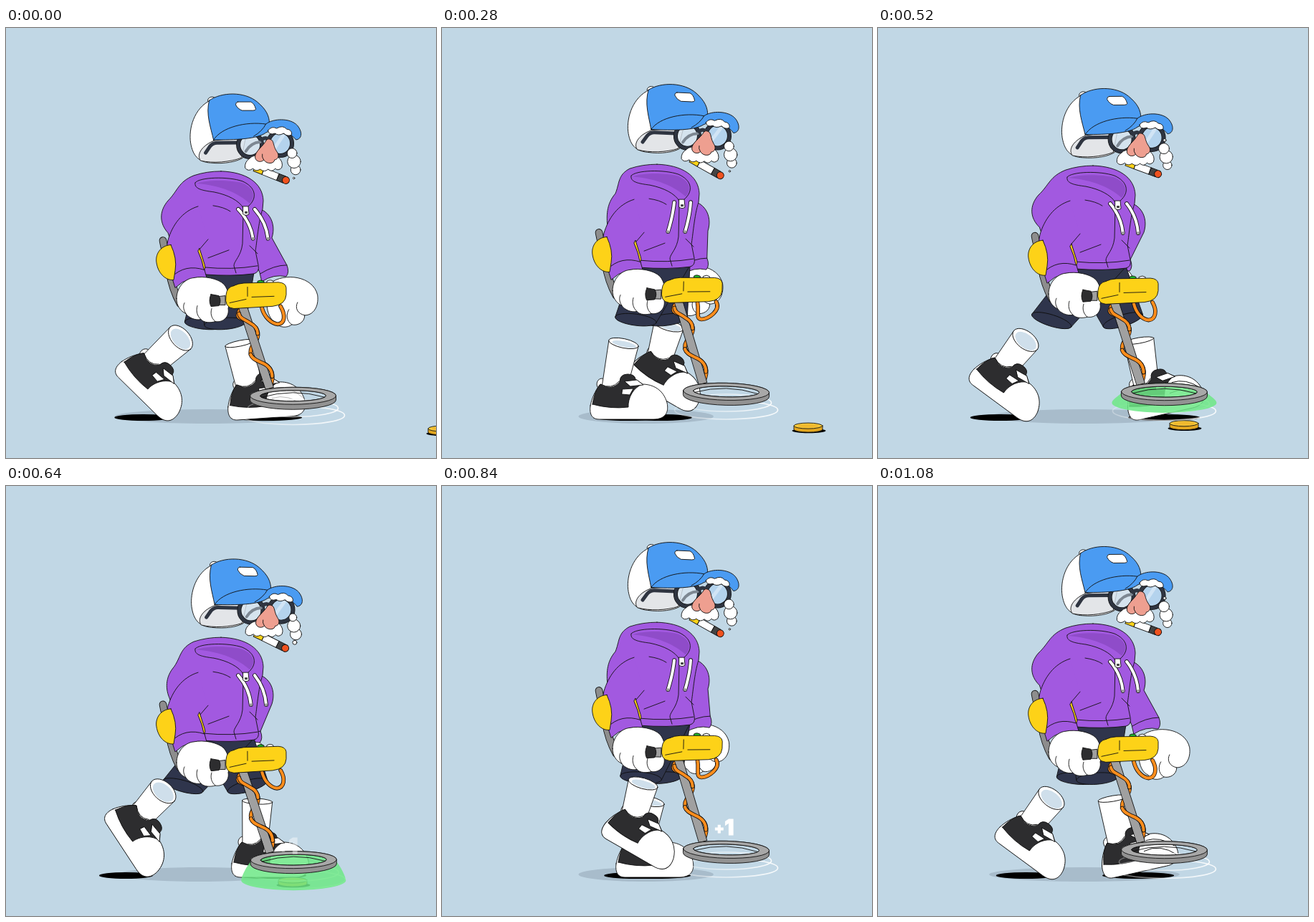
Animation of 600x600 px, one loop 1120 ms. Source, as an HTML page:

```html
<!DOCTYPE html>
<html lang="en">
<head>
<meta charset="utf-8">
<title>Treasure walk</title>
<style>
  html, body { margin: 0; width: 100%; height: 100%; overflow: hidden; background: #c1d7e5; }
  svg { display: block; width: 100vw; height: 100vh; }
  svg path, svg ellipse { stroke: #111; stroke-width: .9; stroke-linejoin: round; stroke-linecap: round; }
  svg .flat { stroke: none; }
  svg .wave { stroke: url(#fade); stroke-width: 1.6; fill: none; }
  text { font-family: Inter, "Open Sans", sans-serif; font-weight: 900; fill: #fff; stroke: #fff; stroke-width: .8; }
</style>
</head>
<body>
<svg viewBox="0 0 600 600">
  <defs>
    <linearGradient id="fade">
      <stop offset="0" stop-color="#fff" stop-opacity=".3"/>
      <stop offset="1" stop-color="#fff" stop-opacity=".9"/>
    </linearGradient>
  </defs>
  <g id="scene"></g>
</svg>
<script>
const LOOP = 1120, STEP = LOOP / 2, TICK = 40, FAR = 36;
const PURPLE = '#a259e0', YELLOW = '#fdd218', GREY = '#a0a0a0', ORANGE = '#ff8d1c',
      BLUE = '#4a9bf2', DARK = '#2d2d2f', NAVY = '#2f354c', WHITE = '#fff', FRAME = '#2f3541';

// Motion rules
const clamp = v => Math.min(1, Math.max(0, v));
const ramp = (t, from, to) => clamp((t - from) / (to - from));
const ease = (t, from, to) => { const u = ramp(t, from, to); return u * u * (3 - 2 * u); };
const bump = (t, from, peak, to) => ease(t, from, peak) - ease(t, peak, to);
const wave = (t, mean, amp, peak, period = STEP) => mean + amp * Math.cos(2 * Math.PI * (t - peak) / period);

// A leg pushes back evenly through the stance, then swings forward with the toe lifting.
function legPose(t, side, bob) {
  const p = t % LOOP, u = p % STEP / STEP, arc = Math.sin(Math.PI * u);
  const x = p < STEP ? 363 - 192 * u - 6 * arc : 171 + 192 * ease(u, 0, 1) + 13 * arc;
  const toeUp = bump(p, 880, 1000, 1160) + bump(p + LOOP, 880, 1000, 1160);
  const turn = 60 * bump(p, 280, 700, 980) - 25 * toeUp;
  return {
    x: x + side, turn,
    y: 517 - .47 * Math.abs(turn) - 18 * bump(p, 640, 920, LOOP),
    sockX: wave(p, 267, 61, -40, LOOP) + side,
    sockY: 440 - 25 * bump(p, 400, 840, 1160),
    open: 4 + 9 * bump(p, 100, 620, 1000),
    hemX: wave(p, 274, 32, -20, LOOP) + side,
    hemY: 412 + bob * .55
  };
}

// Drawing helpers
const path = (d, fill = 'none', more = '') => `<path d="${d}" fill="${fill}" ${more}/>`;
const oval = (x, y, rx, ry, fill, more = '') =>
  `<ellipse cx="${x}" cy="${y}" rx="${rx}" ry="${ry}" fill="${fill}" ${more}/>`;
const group = (transform, body) => `<g transform="${transform}">${body}</g>`;
const line = (d, color, w, more = '') => path(d, 'none', `style="stroke:${color};stroke-width:${w};${more}"`);
const cord = (d, color, w) => line(d, '#111', w + 1.7) + line(d, color, w);
const FLAT = 'class="flat"';

function footShadow({ x, turn }) {
  const lean = Math.max(turn, 0);
  return oval(x - lean * .35, 543.5, 50 - lean * .22, 4.5, '#000', FLAT);
}

function leg({ x, y, turn, sockX, sockY, open }) {
  const r = turn * Math.PI / 180, c = Math.cos(r), s = Math.sin(r);
  const ax = x - 22 * c + 8 * s, ay = y - 22 * s - 8 * c;
  const len = Math.hypot(sockX - ax, sockY - ay);
  const nx = (ay - sockY) / len, ny = (sockX - ax) / len;
  const tilt = Math.atan2(ny, nx) * 180 / Math.PI;
  const sock = path(`M${sockX - nx * 21} ${sockY - ny * 21}L${ax - nx * 17} ${ay - ny * 17}L${ax + nx * 17} ${ay + ny * 17}L${sockX + nx * 21} ${sockY + ny * 21}Z`, WHITE)
    + group(`translate(${sockX} ${sockY}) rotate(${tilt})`,
        oval(0, 0, 21, open, WHITE) + (open > 5.5 ? oval(1, 1, 17, open - 2.5, '#cfdfeb', FLAT) : ''));
  const place = `translate(${x} ${y}) rotate(${turn})`;
  const shoe =
    path('M-54 10C-56 24 -50 29 -42 29L34 29C50 29 56 20 53 6C48 -12 34 -20 18 -20L6 -27L-14 -24Q-24 -12 -40 -20C-48 -10 -52 0 -54 10Z', WHITE)
    + path('M-51 8C-49 -4 -46 -14 -40 -20Q-24 -10 -13 -23Q-13 -34 -2 -34Q8 -34 9 -27L19 -20C6 -16 -2 0 -1 12Q-26 15 -51 8Z', DARK)
    + path('M-6 -24L11 -26L20 -19L2 -17ZM-9 -13L6 -14L1 -5L-10 -6Z', WHITE)
    + `<g opacity="${clamp(-turn / 12)}">${path('M14 -12Q34 -14 51 4M8 2Q32 -4 52 17')}</g>`;
  return group(place, oval(-38, -20, 7, 8, WHITE)) + sock + group(place, shoe);
}

function thigh({ hemX, hemY }, bob) {
  const tilt = (292 - hemX) * .35, r = tilt * Math.PI / 180;
  const ex = 29 * Math.cos(r), ey = 29 * Math.sin(r);
  return path(`M266 ${340 + bob}L${hemX - ex} ${hemY - ey}L${hemX + ex} ${hemY + ey}L346 ${340 + bob}Z`, NAVY)
    + group(`translate(${hemX} ${hemY}) rotate(${tilt})`, oval(0, 0, 29, 8, NAVY));
}

function farArm(t, bob) {
  const x = wave(t, 354, 20, -20, LOOP), y = 340 + bob;
  const hand = `translate(${wave(t, 360, 39, -20, LOOP)} ${wave(t, 374, 6, 0, LOOP) + bob})`;
  return group(hand,
      path('M-30 -25C-10 -40 30 -35 36 -8C38 8 30 20 18 20C18 30 8 35 0 33C-6 38 -18 38 -22 30C-34 26 -40 0 -30 -25Z', WHITE)
      + path('M18 20C8 18 4 10 8 2M0 33C-8 28 -8 18 -4 12'))
    + path(`M345 ${y - 90}C365 ${y - 90} 378 ${y - 70} 371 ${y - 48}L${x + 18} ${y - 10}Q${x + 22} ${y} ${x + 17} ${y + 6}Q${x} ${y + 2} ${x - 17} ${y + 13}L${x - 20} ${y}L335 ${y - 45}Z`, PURPLE)
    + path(`M${x + 18} ${y - 10}Q${x} ${y - 10} ${x - 19} ${y + 2}`);
}

function torso(hood, swing) {
  const string = (x, y, dx) =>
    cord(`M${x} ${y}Q${x + dx * .65 + 4} ${y + 18} ${x + dx} ${y + 41}`, WHITE, 4)
    + oval(x + dx, y + 41, 2, 2, '#999', FLAT);
  return path(`M300 199C335 200 358 215 359 240L358 252C352 270 350 300 348 310L352 330Q354 340 346 342Q315 346 276 343L240 330L${226 + hood * .3} 285C${214 + hood} 272 ${213 + hood} 255 ${226 + hood} 240C${240 + hood * .5} 226 ${240 + hood * .3} 214 262 205Q280 199 300 199Z`, PURPLE)
    + path('M266 216C280 211 310 211 328 215C346 222 349 234 340 244C325 230 300 219 266 216Z', '#8f4cc9', FLAT)
    + path('M264 215C270 207 310 206 330 213C348 221 352 236 338 248M264 215C262 224 275 226 290 228C310 232 325 240 331 250')
    + path('M276 333Q315 337 351 331M331 258L330 300C328 318 318 324 318 331L321 341M282 320L311 309M289 247Q304 249 313 255M340 303L351 314')
    + string(324, 252, swing) + string(347, 252, swing * .9)
    + path('M331 248L338 248L339 259Q335 262 331 259Z', WHITE) + path('M333 255H337V258H333Z', '#444', FLAT);
}

// e shifts the forearm against the shoulder
function nearArm(e) {
  return cord(`M219 ${297 + e}L228 ${340 + e}Q232 ${365 + e} 243 ${385 + e}`, '#8d8d8d', 9)
    + path(`M268 248C245 255 232 275 226 295C222 310 228 330 231 ${347 + e}L236 ${363 + e}Q255 ${345 + e} 280 ${349 + e}L277 ${338 + e}C276 325 271 318 270 308L282 294`, PURPLE)
    + path(`M231 ${348 + e}Q250 ${329 + e} 277 ${338 + e}`)
    + group(`translate(0 ${e})`,
        path('M230 303C214 304 208 318 210 328C212 342 222 353 234 352L236 339Q239 322 230 303Z', YELLOW)
        + path('M270 308L277 330Q279 337 276 337Q274 325 268 312Z', YELLOW));
}

const nearHand = () =>
  path('M238 378C238 362 250 350 262 349C276 346 296 350 304 358C311 366 313 380 310 392C312 402 304 412 292 410C286 412 276 412 272 407C264 409 254 404 251 399C243 395 238 388 238 378Z', WHITE)
  + path('M251 399C247 393 247 388 249 384M272 407C266 402 265 394 267 388M292 410C286 405 285 398 287 392');

function ring() {
  const hole = 'M354 513A46 7.5 0 0 0 446 513A46 7.5 0 0 0 354 513Z';
  return path(`M340 513A60 12 0 0 1 460 513V519A60 13 0 0 1 340 519Z${hole}`, '#929292', 'fill-rule="evenodd"')
    + path(`M340 513A60 12 0 0 1 460 513A60 12 0 0 1 340 513Z${hole}`, '#a8a8a8', 'fill-rule="evenodd"')
    + path('M356 515Q400 502 444 515');
}

function detector(swing) {
  const low = 368 + swing * .55;
  return cord('M326 393C318 406 330 404 340 411C354 419 354 430 346 440C336 452 342 461 355 466C372 472 375 485 368 501', ORANGE, 4)
    + cord(`M357 390C360 403 ${low - 9} 412 ${low} 413C${low + 10} 412 390 400 383 388`, ORANGE, 4)
    + path('M325 390L337 390L373 501L362 504Z', GREY)
    + cord('M325 398C326 405 333 406 340 411C348 415 351 420 351 426', ORANGE, 4)
    + cord('M341 455C343 461 349 463 355 466C366 470 371 477 371 486', ORANGE, 4)
    + ring()
    + path('M351 357V353Q355 350 360 353V357Z', '#21b52a') + path('M364 357V353Q369 350 373 353V357Z', WHITE)
    + path('M318 359Q308 361 307 372Q304 390 318 391L372 388Q390 386 391 372V362Q390 355 380 354.5L332 355.5Q324 356 318 359Z', YELLOW)
    + path('M337 361V374M343 375L374 374M312 383L335 378')
    + path('M297 374L306 373V386L297 386Z', GREY)
    + path('M286 371L297 373Q301 380 297 387L286 388Q282 380 286 371Z', DARK);
}

function smoke(t) {
  const puff = i => {
    const k = i + t % 280 / 280, r = 1.2 + 8 * Math.sin(Math.PI * k / 4);
    return oval(401 + 2.5 * Math.sin(k * 1.5), 209.5 - 11.6 * k, r, r, WHITE);
  };
  return [0, 1, 2, 3].map(puff).join('');
}

function head(t, turn) {
  const lens = (x, y, tint) =>
    oval(x, y, 16.5, 17, tint, 'fill-opacity=".8" style="stroke-width:6"') +
    oval(x, y, 16.5, 17, 'none', `style="stroke:${FRAME};stroke-width:4.6"`);
  return oval(287, 101, 6, 5, WHITE)
    + path('M284 101C262 112 254 140 257 160C260 178 268 187 285 188C305 190 322 186 330 181L330 140Z', WHITE)
    + path('M290 157C274 163 264 176 271 185C288 189 312 187 328 181L334 152Z', '#e3e5e8')
    + line('M278 174L284 165Q288 160 294 160L323 160', FRAME, 5)
    + lens(340, 163, '#dbe7f0') + lens(382, 161, '#b2d2ef')
    + line('M334 172Q341 160 354 159', '#7d8792', 4)
    + line('M371 172L386 150', '#e4f0fa', 5, 'opacity:.6')
    + line('M356 156Q361 151 367 156', FRAME, 5)
    + path('M283 101C300 89 332 88 350 103C362 113 367 122 367 134Q330 152 289 156C285 138 278 120 283 101Z', BLUE)
    + path('M289 156C300 138 335 130 362 134C372 126 396 125 406 136C414 146 412 155 404 156C395 144 376 139 362 146C350 155 320 156 289 156Z', BLUE)
    + path('M362 134Q357 144 345 151')
    + path('M365 143Q370 136 377 140Q386 135 391 141Q399 142 398 149Q392 152 387 147Q379 151 375 147Q366 150 365 143Z', WHITE)
    + path('M323 103L341 103Q346 105 348 113Q348 115 344 115L329 115Q323 113 320 107Q320 103 323 103Z', WHITE)
    + group(`translate(349 196) rotate(${22 + turn * 2})`,
        path('M-3 -5H10V5H-3Z', YELLOW) + path('M10 -5H32V5H10Z', WHITE)
        + path('M32 -5H42V5H32Z', '#444') + oval(44, 0, 5, 5, '#f0521f'))
    + path('M339 182Q346 175 355 180Q370 174 379 180Q387 187 384 195Q379 200 375 196Q371 202 365 197Q360 202 354 197Q348 201 344 196Q337 201 333 195Q332 187 339 182Z', WHITE)
    + path('M363 156C358 166 346 172 347 181C349 188 357 187 359 184C364 191 374 189 374 184C380 183 381 177 377 172C373 166 373 160 371 157Q366 153 363 156Z', '#ee9f90')
    + path('M359 184Q356 180 357 176')
    + smoke(t);
}

function coin(t) {
  const x = Math.max(400, 609 - .35 * t), y = 561 - .014 * t;
  return `<g opacity="${1 - ramp(t, 660, 740)}">${oval(x + 1, y + 5, 23.5, 3.2, '#000', FLAT)}`
    + path(`M${x - 20} ${y - 2}V${y + 3}A20 4 0 0 0 ${x + 20} ${y + 3}V${y - 2}Z`, '#e3a71f')
    + `${oval(x, y - 2, 20, 4, '#f9cb3d')}${oval(x, y - 2, 15, 2.4, '#f0b92e', FLAT)}</g>`;
}

function signal(t, x, y) {
  const glow = .85 * (ramp(t, 360, 480) - ramp(t, 680, 760));
  const b = y + 3 + 25 * ramp(t, 440, 600);
  return oval(x, y + 17, 63, 12, 'none', 'class="wave"')
    + oval(x, y + 27, 72, 13, 'none', 'class="wave"')
    + path(`M${x - 58} ${y}C${x - 66} ${y + 8} ${x - 73} ${b - 4} ${x - 73} ${b}A73 14 0 0 0 ${x + 73} ${b}C${x + 73} ${b - 4} ${x + 66} ${y + 8} ${x + 58} ${y}A58 12 0 0 0 ${x - 58} ${y}Z`, '#6ee886', `${FLAT} opacity="${glow}"`);
}

function score(t) {
  const alpha = ramp(t, 600, 690) - ramp(t, 880, 980);
  const y = 521 - 38 * (1 - (1 - ramp(t, 600, 980)) ** 2.2);
  return `<text y="${y}" opacity="${alpha}"><tspan x="379.5" font-size="21" dy="-2">+</tspan><tspan x="394" font-size="30" dy="2">1</tspan></text>`;
}

function scene(t) {
  const bob = wave(t, -4, 17.5, 115), hand = wave(t, -6, 14.5, 105);
  const tool = wave(t, -3.3, 13.5, 115), tilt = wave(t, .6, 1.1, 350);
  const swing = wave(t, 6, 15, 20), hood = wave(t, 8, 10.5, 215);
  const turn = wave(t, 1.2, 1.8, 210);
  const near = legPose(t, 0, bob), far = legPose(t + STEP, FAR, bob);
  return oval(wave(t, 283, 15, 410), 542, wave(t, 112, 21, 510), 10, '#a8bccb', FLAT)
    + footShadow(far) + footShadow(near)
    + leg(far) + farArm(t, bob)
    + thigh(far, bob) + thigh(near, bob) + leg(near)
    + group(`translate(0 ${bob})`, torso(hood, swing) + nearArm(hand - bob))
    + group(`translate(0 ${hand})`, nearHand())
    + coin(t) + signal(t, 400 - tilt * 2.5, 513 + tool)
    + group(`translate(0 ${tool}) rotate(${tilt} 340 370)`, detector(swing))
    + group(`translate(${wave(t, 2, 2.3, 200)} ${wave(t, -6.5, 17.3, 105)}) rotate(${turn} 320 140)`, head(t, turn))
    + score(t);
}

const stage = document.getElementById('scene');
const start = performance.now();
let shown = -1;
function draw(now) {
  const t = Math.floor(Math.max(0, now - start) % LOOP / TICK) * TICK;
  if (t !== shown) stage.innerHTML = scene(shown = t);
  requestAnimationFrame(draw);
}
draw(start);
</script>
</body>
</html>
```
